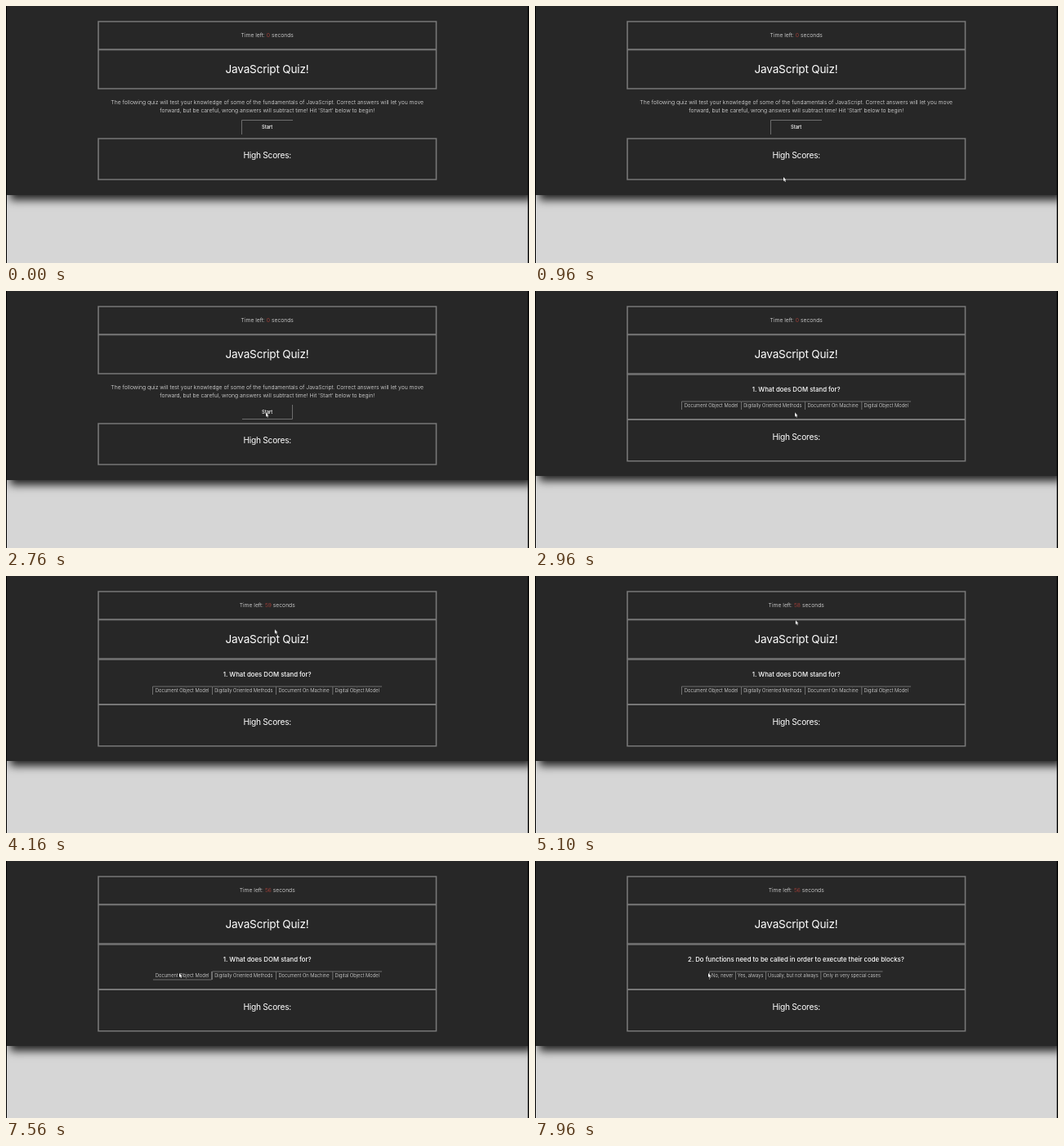
Animation, 640 px wide and 314 px high, one loop 8 s. Source, as an HTML page:

```html
<!DOCTYPE html>
<html lang="en">
<head>
<meta charset="utf-8">
<title>JavaScript Quiz</title>
<style>
html, body { margin: 0; width: 100%; height: 100%; overflow: hidden; background: #d6d6d6; }
.stage { position: relative; width: 640px; height: 314px; overflow: hidden; }
.panel {
  position: absolute; left: 0; top: 0; width: 640px; height: 231px;
  background: #272727; box-shadow: 5px 6px 10px #222;
  animation: panel 8s step-end infinite;
}
svg { position: absolute; left: 0; top: 0; }
text { font-family: Inter, "Open Sans", sans-serif; text-anchor: middle; fill: #e8e8e8; }
.small { font-size: 6.8px; font-weight: 300; }
.title { font-size: 13.6px; letter-spacing: -.2px; fill: #fff; }
.scores { font-size: 10.2px; letter-spacing: -.25px; fill: #fff; }
.question { font-size: 7.8px; font-weight: 500; fill: #fff; }
.option { font-size: 5.8px; font-weight: 300; }
.start { font-size: 5.8px; font-weight: 500; fill: #fff; }
#seconds { fill: #b8423a; }
.box { fill: none; stroke: #777; stroke-width: 1.6; }
.edge { fill: none; stroke: #6e6e6e; stroke-width: 1; }

.intro, .quiz, .q1, .q2, .up, .down { animation: 8s step-end infinite; }
.intro { animation-name: intro; }
.quiz { animation-name: quiz; }
.q1 { animation-name: first; }
.q2 { animation-name: second; }
.intro .up { animation-name: start-up; }
.intro .down { animation-name: start-down; }
.q1 .up { animation-name: pick-up; }
.q1 .down { animation-name: pick-down; }
.cursor { animation: cursor 8s linear infinite; }

@keyframes panel { 0% { height: 231px } 37%, 100% { height: 226px } }
@keyframes intro { 0% { opacity: 1 } 37%, 100% { opacity: 0 } }
@keyframes quiz { 0% { opacity: 0 } 37%, 100% { opacity: 1 } }
@keyframes first { 0% { opacity: 1 } 96.25%, 100% { opacity: 0 } }
@keyframes second { 0% { opacity: 0 } 96.25%, 100% { opacity: 1 } }
@keyframes start-up { 0% { opacity: 1 } 34.5%, 100% { opacity: 0 } }
@keyframes start-down { 0% { opacity: 0 } 34.5%, 100% { opacity: 1 } }
@keyframes pick-up { 0% { opacity: 1 } 94.5%, 100% { opacity: 0 } }
@keyframes pick-down { 0% { opacity: 0 } 94.5%, 100% { opacity: 1 } }
@keyframes cursor {
  0% { transform: translate(700px, 80px); animation-timing-function: step-end }
  6.25% { transform: translate(488px, 80px) }
  9.8% { transform: translate(222px, 218px) }
  12%, 15.3% { transform: translate(304px, 209px) }
  19% { transform: translate(254px, 150px) }
  22% { transform: translate(328px, 60px) }
  25.4%, 26.2% { transform: translate(322px, 37px) }
  29% { transform: translate(300px, 110px) }
  31.3%, 46.2% { transform: translate(318px, 148.5px) }
  50.5% { transform: translate(333px, 80px) }
  54.5%, 57% { transform: translate(322px, 41px) }
  59.5%, 61.2% { transform: translate(324px, 52px) }
  63.75% { transform: translate(319px, 54px) }
  67%, 72% { transform: translate(268px, 80px) }
  74.3% { transform: translate(453px, 135px) }
  76.3%, 82% { transform: translate(349px, 137px) }
  85.4% { transform: translate(211px, 134px) }
  88.5% { transform: translate(222px, 136px) }
  91.3%, 100% { transform: translate(212px, 137px) }
}
</style>
</head>
<body>
<div class="stage">
  <div class="panel"></div>
  <svg width="640" height="314" viewBox="0 0 640 314">
    <path d="M0 0H1V314H0ZM638.6 0H640V314H638.6Z"/>
    <path class="box" d="M113 19H526.5V53H113ZM113 53.5H526.5V101H113Z"/>
    <text class="small" x="319.7" y="38.4">Time left: <tspan id="seconds">0</tspan> seconds</text>
    <text class="title" x="319.5" y="82">JavaScript Quiz!</text>

    <g class="intro">
      <text class="small" x="319.7" y="119.6">The following quiz will test your knowledge of some of the fundamentals of JavaScript. Correct answers will let you move</text>
      <text class="small" x="319.7" y="129.7">forward, but be careful, wrong answers will subtract time! Hit 'Start' below to begin!</text>
      <path class="edge up" d="M288.5 157V139.5H351"/>
      <path class="edge down" d="M289 156.5H350.5V139"/>
      <text class="start" x="319.6" y="150.2">Start</text>
      <path class="box" d="M113 162H526.5V212H113Z"/>
      <text class="scores" x="319.7" y="186.3">High Scores:</text>
    </g>

    <g class="quiz">
      <path class="box" d="M113 102H526.5V156.7H113ZM113 157.2H526.5V207.7H113Z"/>
      <text class="scores" x="319.7" y="182">High Scores:</text>
      <g class="q1">
        <text class="question" x="319.7" y="123.2">1. What does DOM stand for?</text>
        <path class="edge up" d="M179.5 145V135H252"/>
        <path class="edge down" d="M180 145H251.5V135"/>
        <path class="edge" d="M252.5 145V135H460M330.5 145V135M399.8 145V135"/>
        <text class="option" x="215.6" y="141.7">Document Object Model</text>
        <text class="option" x="290.8" y="141.7">Digitally Oriented Methods</text>
        <text class="option" x="364.5" y="141.7">Document On Machine</text>
        <text class="option" x="429.7" y="141.7">Digital Object Model</text>
      </g>
      <g class="q2">
        <text class="question" x="319.5" y="123.2">2. Do functions need to be called in order to execute their code blocks?</text>
        <path class="edge" d="M213.5 145V135H425.5M245.5 145V135M282.5 145V135M349.8 145V135"/>
        <text class="option" x="229.2" y="141.7">No, never</text>
        <text class="option" x="263.6" y="141.7">Yes, always</text>
        <text class="option" x="315.9" y="141.7">Usually, but not always</text>
        <text class="option" x="387.8" y="141.7">Only in very special cases</text>
      </g>
    </g>

    <path class="cursor" d="M0 0V5L1.2 4L2 5.9L2.9 5.5L2.1 3.7H3.6Z" fill="#fff" stroke="#111" stroke-width=".7" paint-order="stroke"/>
  </svg>
</div>
<script>
const LOOP = 8000, START = 2960, LIMIT = 60;
const seconds = document.getElementById("seconds");
const clock = document.querySelector(".cursor").getAnimations()[0];

function tick() {
  const time = (clock ? clock.currentTime || 0 : performance.now()) % LOOP;
  const left = time < START ? 0 : LIMIT - Math.floor((time - START) / 1000);
  if (seconds.textContent !== String(left)) seconds.textContent = left;
  requestAnimationFrame(tick);
}
tick();
</script>
</body>
</html>
```
